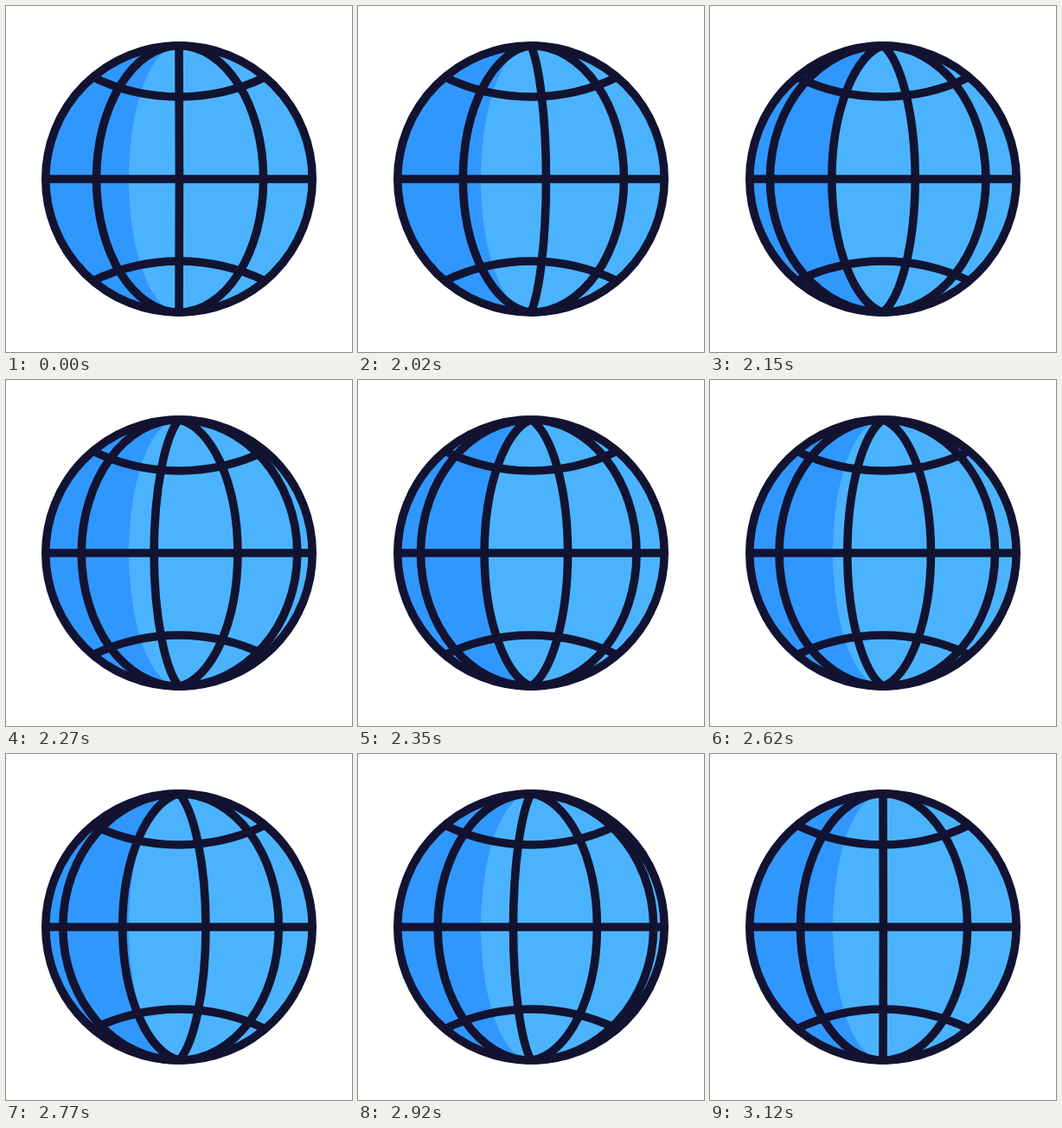
An HTML page that plays this animation: 400x400 px, repeating every 3200 ms.

```html
<!DOCTYPE html>
<html lang="en">
<head>
<meta charset="utf-8">
<title>Spinning globe</title>
<style>
  html, body { margin: 0; width: 100%; height: 100%; overflow: hidden; background: #fff; }
  svg { display: block; width: 100vw; height: 100vh; }
  .ink { fill: none; stroke: #121331; stroke-width: 9.6; }
</style>
</head>
<body>
<svg viewBox="-200 -200 400 400">
  <circle r="154.2" fill="#4bb3fd"/>
  <path d="M0-154.2A154.2 154.2 0 0 0 0 154.2A58 154.2 0 0 1 0-154.2Z" fill="#3097fe"/>
  <g class="ink">
    <path d="M-154.2 0H154.2"/>
    <path d="M-100-118A229 229 0 0 0 100-118"/>
    <path d="M-100 118A229 229 0 0 1 100 118"/>
    <path id="meridians" stroke-linejoin="round"/>
    <circle r="154.2"/>
  </g>
</svg>
<script>
  const LOOP = 3200, START = 2000, SPIN = 1125, STEPS = 7, TICK = 25;
  const R = 154.2, K = 0.5523;
  const slots = [-152, -95.5, 0.4, 97.6, 154];
  const meridians = document.getElementById('meridians');

  const mix = (a, b, p) => a + (b - a) * p;
  const bezier = (a, b, s) => 3 * a * s * (1 - s) ** 2 + 3 * b * s * s * (1 - s) + s ** 3;

  // cubic-bezier(.167, .167, .46, 1)
  function ease(u) {
    if (u <= 0 || u >= 1) return u <= 0 ? 0 : 1;
    let lo = 0, hi = 1;
    for (let i = 0; i < 30; i++) {
      const mid = (lo + hi) / 2;
      if (bezier(0.167, 0.46, mid) < u) lo = mid; else hi = mid;
    }
    return bezier(0.167, 1, lo);
  }

  // Pole-to-pole curve: elliptical at the sides, flatter near the middle
  function meridian(x) {
    const round = Math.min(1, Math.abs(x) / 96.5);
    const cx = (x * K).toFixed(2);
    const y1 = (R * mix(0.82, 1, round)).toFixed(2);
    const y2 = (R * mix(0.45, K, round)).toFixed(2);
    return `M0 ${-R}C${cx} ${-y1} ${x} ${-y2} ${x} 0S${cx} ${y1} 0 ${R}`;
  }

  function draw(time) {
    // 40 poses per second, shown on a 10 ms clock
    const tick = Math.floor((Math.floor((time % LOOP) / 10) + 0.5) / 2.5);
    const turn = STEPS * ease((tick * TICK - START) / SPIN);
    const p = turn % 1;
    let d = '';
    for (let i = 0; i < 4; i++) {
      const hidden = i === 0 && (turn < 0.2 || p === 0);
      if (!hidden) d += meridian(+mix(slots[i], slots[i + 1], p).toFixed(2));
    }
    meridians.setAttribute('d', d);
  }

  function loop() {
    draw(performance.now());
    requestAnimationFrame(loop);
  }
  loop();
</script>
</body>
</html>
```
